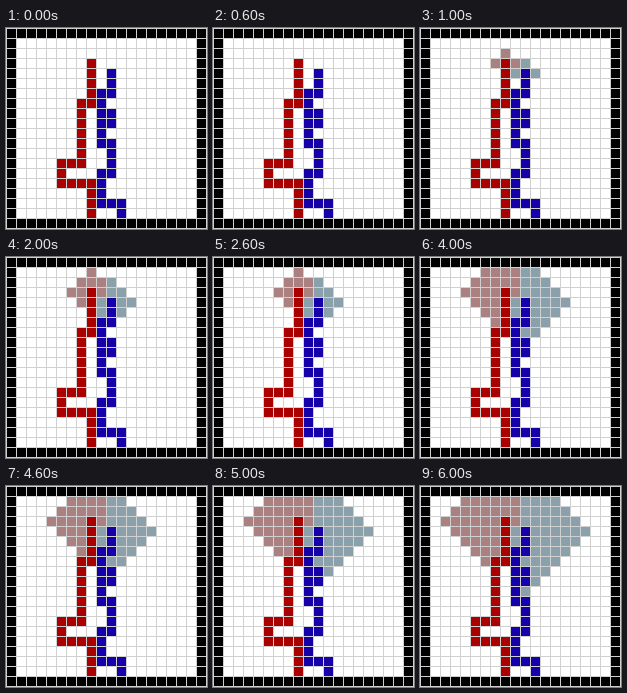
An HTML page with a canvas for the animation above (7000 ms loop, 201 by 201 pixels).

```html
<!DOCTYPE html>
<html>
<head>
<meta charset="utf-8">
<style>
html, body { margin: 0; width: 100%; height: 100%; overflow: hidden; background: #fff; }
canvas { display: block; }
</style>
</head>
<body>
<canvas id="stage" width="201" height="201"></canvas>
<script>
const ctx = document.getElementById('stage').getContext('2d');
const CELL = 10, COUNT = 20, STEP_MS = 1000, STEPS = 7;
const EMPTY = '#fff', BORDER = '#000', LINE = '#d0d0d0';

// Each trail is walked from the head: d = down, l = left, r = right.
const players = [
  { x: 8, y: 3, moves: 'ddddlddddddllddrrrddd', color: '#aa0000', reach: '#aa8080' },
  { x: 10, y: 4, moves: 'ddlddrdlddrdddldddrrd', color: '#1500aa', reach: '#8aa0aa' }
];

const key = (x, y) => y * COUNT + x;
const walls = new Map();
const build = (x, y, color) => walls.set(key(x, y), color);

for (let i = 0; i < COUNT; i++) {
  for (const edge of [0, COUNT - 1]) {
    build(i, edge, BORDER);
    build(edge, i, BORDER);
  }
}

for (const { x: headX, y: headY, moves, color } of players) {
  let x = headX, y = headY;
  build(x, y, color);
  for (const move of moves) {
    if (move === 'd') y++;
    else x += move === 'r' ? 1 : -1;
    build(x, y, color);
  }
}

// Only open cells connected to the top left corner can be claimed.
const open = new Set();
function flood(x, y) {
  const k = key(x, y);
  if (walls.has(k) || open.has(k)) return;
  open.add(k);
  flood(x + 1, y);
  flood(x - 1, y);
  flood(x, y + 1);
  flood(x, y - 1);
}
flood(1, 1);

// A cell belongs to the head that is nearer in steps.
function cellColor(x, y, radius) {
  const k = key(x, y);
  if (walls.has(k)) return walls.get(k);
  const [red, blue] = players.map(p => Math.abs(x - p.x) + Math.abs(y - p.y));
  if (!open.has(k) || Math.min(red, blue) > radius) return EMPTY;
  return players[red < blue ? 0 : 1].reach;
}

function draw(radius) {
  ctx.fillStyle = LINE;
  ctx.fillRect(0, 0, COUNT * CELL + 1, COUNT * CELL + 1);
  for (let y = 0; y < COUNT; y++) {
    for (let x = 0; x < COUNT; x++) {
      ctx.fillStyle = cellColor(x, y, radius);
      ctx.fillRect(x * CELL + 1, y * CELL + 1, CELL - 1, CELL - 1);
    }
  }
}

function tick() {
  draw(Math.floor(performance.now() / STEP_MS) % STEPS);
  requestAnimationFrame(tick);
}
tick();
</script>
</body>
</html>
```
